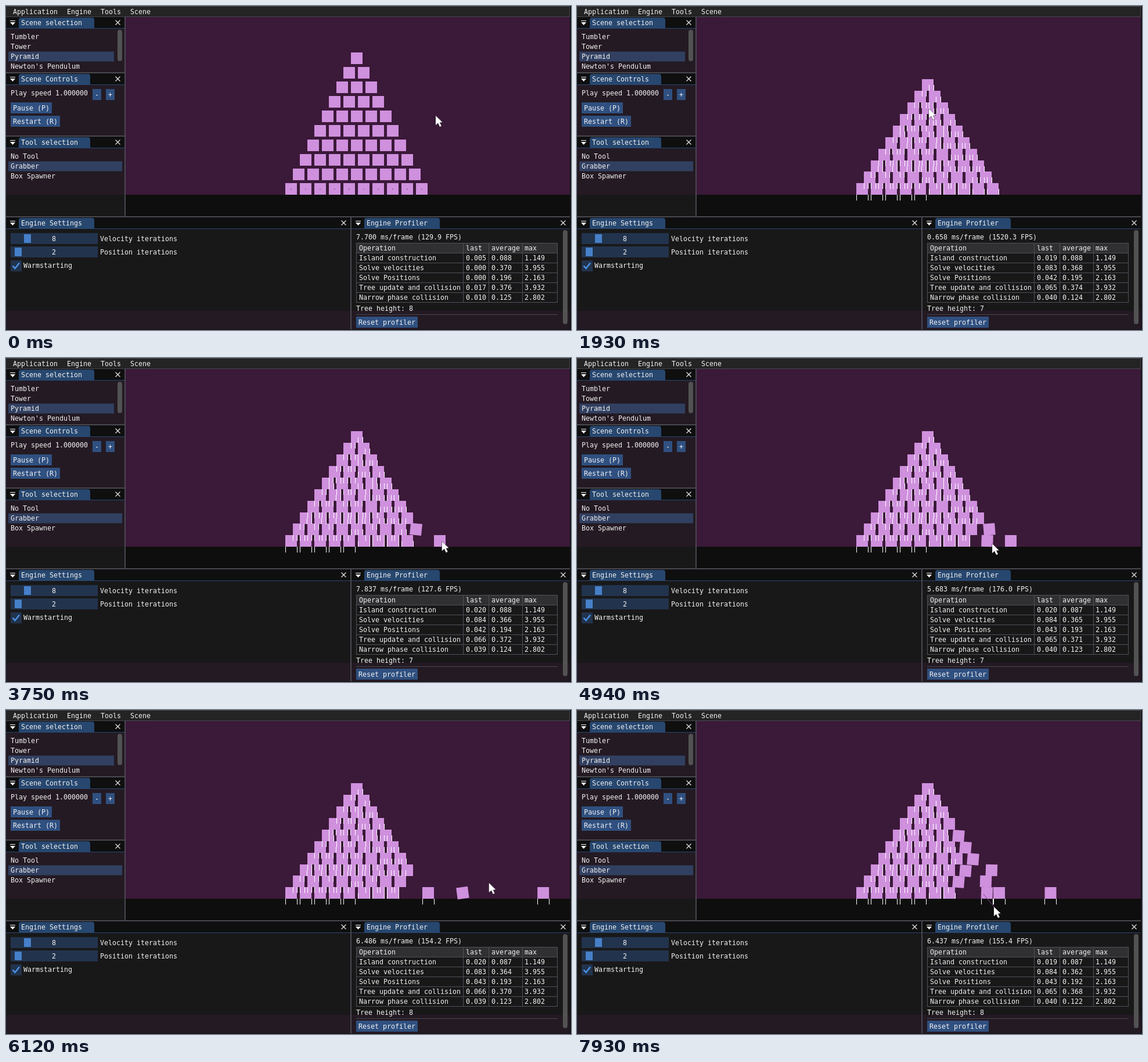
An HTML page with a canvas for the animation above (8 s loop, 973 px wide and 558 px high).

```html
<!DOCTYPE html>
<html lang="en">
<head>
<meta charset="utf-8">
<style>
html, body { margin: 0; width: 100%; height: 100%; overflow: hidden; background: #111; }
canvas { display: block; }
</style>
</head>
<body>
<canvas id="stage" width="973" height="558"></canvas>
<script>
const ctx = document.getElementById('stage').getContext('2d');
const LOOP = 8000, SIZE = 20, FLOOR = 315.3, PITCH = 19.9;
const BLUE = '#27476f', BUTTON = '#2f5080', SELECTED = '#314061', EDGE = '#484850', PINK = '#cf90dd';

// Pointer stops: [time, x, y]
const STOPS = [[0, 740, 189], [1000, 740, 189], [1930, 606, 177], [2840, 690, 240], [3150, 720, 316],
  [3750, 751, 316], [4050, 700, 320], [4940, 715, 320], [6120, 832, 298], [6860, 678, 320], [7930, 718, 339]];

// Operation, usual cost, first average, maximum
const OPS = [
  ['Island construction', 0.020, 0.0885, '1.149'],
  ['Solve velocities', 0.084, 0.3700, '3.955'],
  ['Solve Positions', 0.043, 0.1960, '2.163'],
  ['Tree update and collision', 0.066, 0.3760, '3.932'],
  ['Narrow phase collision', 0.040, 0.1250, '2.802']
];

function hash(a, b) {
  const v = Math.sin(a * 12.9898 + b * 78.233) * 43758.5453;
  return v - Math.floor(v);
}

// Progress from 0 to 1 between two times
function ramp(t, from, to) {
  return Math.min(1, Math.max(0, (t - from) / (to - from)));
}

function rect(x, y, w, h, color) {
  ctx.fillStyle = color;
  ctx.fillRect(x, y, w, h);
}

function rounded(x, y, w, h, color, radius) {
  ctx.fillStyle = color;
  ctx.beginPath();
  ctx.roundRect(x, y, w, h, radius);
  ctx.fill();
}

function shape(points, color) {
  ctx.fillStyle = color;
  ctx.beginPath();
  points.forEach(([x, y]) => ctx.lineTo(x, y));
  ctx.closePath();
  ctx.fill();
}

function line(points, color, width) {
  ctx.strokeStyle = color;
  ctx.lineWidth = width;
  ctx.beginPath();
  points.forEach(([x, y]) => ctx.lineTo(x, y));
  ctx.stroke();
}

// y is the middle of the line of text
function text(str, x, y) {
  ctx.fillStyle = '#f2f2f2';
  ctx.fillText(str, x, y + 4);
}

function button(label, x, y, w) {
  rect(x, y, w, 19, BUTTON);
  text(label, x + 4, y + 10);
}

function list(items, y, selected, w) {
  items.forEach((item, i) => {
    const mid = y + 17 * i;
    if (item === selected) rect(4, mid - 8.5, w, 17, SELECTED);
    text(item, 8, mid);
  });
}

function panel(title, x, y, w, h) {
  rect(x, y, w, h, 'rgba(28,27,28,.75)');
  rect(x, y, w, 19, '#0f0f10');
  rounded(x + 22, y + 1, title.length * 7 + 25, 19, BLUE, [4, 4, 0, 0]);
  rect(x, y + 19, w, 1, BLUE);
  text(title, x + 26, y + 10);
  rect(x + 7, y + 6, 9, 1, '#fff');
  shape([[x + 7, y + 9], [x + 16, y + 9], [x + 11.5, y + 14]], '#fff');
  const cx = x + w - 12.5, cy = y + 9.5;
  line([[cx - 4, cy - 4], [cx + 4, cy + 4]], '#eee', 1.1);
  line([[cx - 4, cy + 4], [cx + 4, cy - 4]], '#eee', 1.1);
}

function slider(label, value, y, grab) {
  rect(8, y, 150, 19, '#22334d');
  rect(grab, y + 2, 12, 15, '#4680c8');
  text(value, 79, y + 10);
  text(label, 162, y + 10);
}

// How far a box has left its place in the pile: { dx, dy, deg }
function shift(row, i, t) {
  const level = 9 - row;
  const drag = ramp(t, 4050, 4940), slide = ramp(t, 5300, 6420);
  const lean = ramp(t, 3150, 4940), fall = ramp(t, 5400, 5800);
  const slump = ramp(t, 6950, 7930);
  if (row === 9 && i === 9) {
    return { dx: 31 * ramp(t, 3150, 3750) + 0.278 * Math.max(0, t - 5480), dy: 0, deg: 0 };
  }
  if (row === 9 && i === 8) {
    return { dx: 15.5 * drag + 109 * slide, dy: 0, deg: 2 * drag * (1 - slide) - 11 * Math.sin(Math.PI * slide) };
  }
  if (row === 8 && i === 8) {
    return { dx: 6 * lean + 17 * fall, dy: 20 * fall * fall, deg: 6 * Math.sin(5.4 * lean) * (1 - fall) };
  }
  // The third pull takes its column along, less so higher up.
  if (i === 7 && row > 6) return { dx: (20 + 20 / (1 + 3 * level)) * slump, dy: 0, deg: 2 * slump };
  // What rested on that column tips over.
  if (i === Math.min(row, 6) && row > 3 && row < 9) {
    return { dx: 3 * slump, dy: slump, deg: 4.5 * slump };
  }
  return { dx: 0, dy: 0, deg: 0 };
}

function boxAt(row, i, t) {
  const level = 9 - row, s = t / 1000;
  const gap = 25 - PITCH, drop = Math.min(42 * s * s, gap * level);
  const { dx, dy, deg } = shift(row, i, t);
  const inPlace = Math.abs(dx) < 2 && Math.abs(deg) < 1.5;
  return {
    x: Math.round(603.5 + (i - row / 2) * 25) + dx,
    y: Math.round(FLOOR - 25 * level + drop) + dy,
    deg,
    home: inPlace && drop >= gap * level
  };
}

function contacts(box, offsets, up) {
  for (const dx of offsets) {
    rect(Math.round(box.x + dx) - 1, Math.round(box.y) + (up ? 0 : 10), 1, 10, '#fff');
  }
}

function pyramid(t) {
  const rows = Array.from({ length: 10 }, (_, row) =>
    Array.from({ length: row + 1 }, (_, i) => boxAt(row, i, t)));
  rows.flat().forEach(b => {
    ctx.save();
    ctx.translate(b.x, b.y);
    ctx.rotate(b.deg * Math.PI / 180);
    rect(-SIZE / 2, -SIZE / 2, SIZE, SIZE, PINK);
    ctx.restore();
  });
  if (t < 200) {
    rows[9].forEach(b => rect(b.x - 1, b.y, 2, 1, '#7a4488'));
    return;
  }
  rows.forEach((boxes, row) => boxes.forEach((b, i) => {
    const grounded = b.y > FLOOR - 1 && (b.home || t > 5600 && Math.abs(b.deg) < 3);
    if (grounded) contacts(b, [-9.5, 10.5], b.home && i > 4);
    if (row === 9 || !b.home) return;
    // Normals point down at the left rim and up at the right rim, mixed between.
    [0, 1].forEach(side => {
      const up = hash(row + side * 20, i) < (i + side) / (row + 1);
      if (rows[row + 1][i + side].home) contacts(b, side ? [3, 10.5] : [-9.5, -2], up);
    });
  }));
}

function scene(t) {
  rect(0, 0, 973, 558, '#3b1939');
  rect(0, 325, 973, 200, '#0e0e0e');
  pyramid(t);
}

function leftPanels() {
  panel('Scene selection', 0, 19, 205, 95);
  list(['Tumbler', 'Tower', 'Pyramid', "Newton's Pendulum"], 53, 'Pyramid', 182);
  rounded(192, 41, 8, 54, '#525253', 4);

  panel('Scene Controls', 0, 116, 205, 107);
  text('Play speed 1.000000', 8, 150);
  button('-', 149, 143, 15);
  button('+', 172, 143, 15);
  button('Pause (P)', 8, 166, 71);
  button('Restart (R)', 8, 189, 85);

  panel('Tool selection', 0, 225, 205, 137);
  list(['No Tool', 'Grabber', 'Box Spawner'], 259, 'Grabber', 196);
}

function settings() {
  panel('Engine Settings', 0, 364, 594, 194);
  slider('Velocity iterations', '8', 391, 31);
  slider('Position iterations', '2', 414, 15);
  rect(8, 438, 19, 19, '#22334d');
  line([[11.5, 447.5], [15.5, 452], [23, 442.5]], '#4b94ee', 2.4);
  text('Warmstarting', 30, 447);
}

function profiler(t) {
  const step = Math.floor(t / 70), resting = t < 200;
  const fast = !resting && t < 3150;
  const ms = fast ? 0.64 + 0.03 * hash(step, 9) : 5.4 + 2.5 * hash(step, 9);

  panel('Engine Profiler', 595, 364, 377, 194);
  text(`${ms.toFixed(3)} ms/frame (${(1000 / ms).toFixed(1)} FPS)`, 603, 398);
  rect(603, 408, 347, 18, '#303033');
  const columns = [608, 792, 836, 893];
  ['Operation', 'last', 'average', 'max'].forEach((s, i) => text(s, columns[i], 417));
  OPS.forEach(([name, cost, average, max], i) => {
    const y = 434 + 17 * i;
    const idle = name.startsWith('Solve') ? 0 : cost / 4;
    const last = resting ? idle : cost + 0.003 * (hash(step, i) - 0.5);
    const cells = [name, last.toFixed(3), (average * (1 - 0.022 * t / LOOP)).toFixed(3), max];
    cells.forEach((s, c) => text(s, columns[c], y));
    rect(603, y - 9, 347, 1, '#4f4f59');
  });
  for (const x of [603, 787, 831, 889, 949]) rect(x, 408, 1, 103, '#4f4f59');
  for (const y of [408, 510]) rect(603, y, 347, 1, '#4f4f59');
  text('Tree height: ' + (t >= 1000 && t < 5700 ? 7 : 8), 603, 521);
  rect(603, 531, 347, 1, EDGE);
  button('Reset profiler', 603, 535, 106);
  rounded(959, 386, 8, 162, '#525253', 4);
}

function frame() {
  rect(0, 0, 971, 19, EDGE);
  rect(0, 1, 970, 17, '#242424');
  let x = 12;
  for (const item of ['Application', 'Engine', 'Tools', 'Scene']) {
    text(item, x, 10);
    x += item.length * 7 + 16;
  }
  for (const y of [114, 223]) rect(0, y, 205, 2, EDGE);
  rect(204, 19, 2, 343, EDGE);
  rect(0, 362, 973, 2, EDGE);
  rect(593, 363, 2, 195, EDGE);
  rect(971, 0, 2, 558, '#111');
  rect(0, 557, 973, 1, '#111');
}

function pointer(t) {
  const n = STOPS.findIndex(stop => stop[0] > t);
  const [from, to] = n < 0 ? [STOPS.at(-1), STOPS.at(-1)] : [STOPS[n - 1], STOPS[n]];
  const f = n < 0 ? 0 : ramp(t, from[0], to[0]);
  const x = from[1] + (to[1] - from[1]) * f, y = from[2] + (to[2] - from[2]) * f;
  if (t > 6900) {
    const held = boxAt(9, 7, t);
    line([[held.x - 6, held.y + 2], [x, y]], '#84418a', 1);
  }
  const arrow = [[0, 0], [0, 16], [4, 12.5], [7, 19], [9.8, 17.8], [6.9, 11.6], [11.5, 11.3]]
    .map(([dx, dy]) => [x + dx, y + dy]);
  line([...arrow, arrow[0]], '#222', 1);
  shape(arrow, '#fff');
}

function draw(now) {
  let t = now % LOOP;
  // The opening seconds advance in coarse steps.
  if (t < 1400) t -= t % 200;
  else if (t < 1860) t = t < 1660 ? 1400 : 1660;
  ctx.font = '11.63px "DejaVu Sans Mono", monospace';
  scene(t);
  leftPanels();
  settings();
  profiler(t);
  frame();
  pointer(t);
  requestAnimationFrame(draw);
}

requestAnimationFrame(draw);
</script>
</body>
</html>
```
